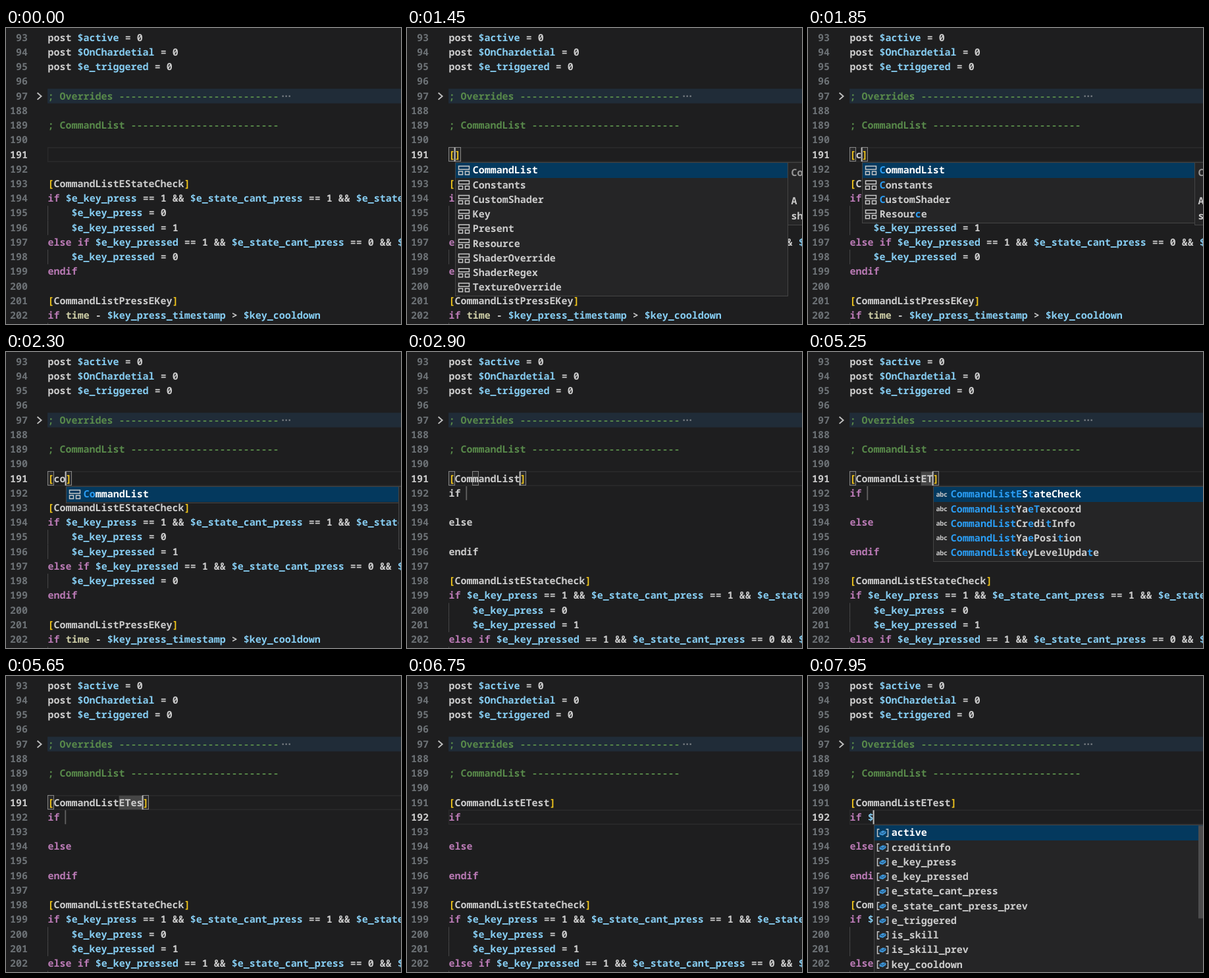
An HTML page for the animation above (8 s loop, 600 by 450 pixels).

```html
<!DOCTYPE html>
<html lang="en">
<head>
<meta charset="utf-8">
<title>Editor snippet completion</title>
<style>
html, body { margin: 0; width: 100%; height: 100%; overflow: hidden; background: #1e1e1f; }
svg { display: block; width: 600px; height: 450px; }
text { font: 600 15px "Noto Sans Mono", "DejaVu Sans Mono", monospace; white-space: pre; fill: #cccccc; text-rendering: geometricPrecision; }
.num { fill: #6c7175; text-anchor: end; }
.num.on { fill: #cacaca; }
.com { fill: #58894a; }
.var { fill: #86cdf2; }
.key { fill: #ba7ab5; }
.fn { fill: #cdcda6; }
.br { fill: #f0c51c; }
.hit { fill: #2a9df4; }
.sel { fill: #fff; }
.doc { text-anchor: start; fill: #999; }
.abc { font-size: 10px; font-weight: 700; letter-spacing: -.3px; }
.box { fill: #8888881c; stroke: #858585; }
.icon { fill: none; stroke: #c8c8c8; stroke-width: 1.5; }
</style>
</head>
<body>
<svg id="stage" viewBox="0 0 600 450"></svg>
<script>
const LOOP = 8000, ROW = 22.24, CH = 9, LEFT = 63.6;
const stage = document.getElementById("stage");

const rowY = row => 3.4 + row * ROW;
const base = row => rowY(row) + 16.2;
const colX = col => LEFT + col * CH;
const esc = s => s.replace(/&/g, "&amp;").replace(/</g, "&lt;").replace(/>/g, "&gt;");
const span = (cls, s) => `<tspan class="${cls}">${esc(s)}</tspan>`;
const text = (x, y, body, cls = "") => `<text x="${x}" y="${y}" class="${cls}">${body}</text>`;
const rect = (x, y, w, h, fill, extra = "") =>
  `<rect x="${x}" y="${y}" width="${w}" height="${h}" fill="${fill}" ${extra}/>`;

const numbers = [93, 94, 95, 96, 97, ...Array.from({ length: 15 }, (_, i) => 188 + i)];
const head = [
  "post $active = 0", "post $OnChardetial = 0", "post $e_triggered = 0", "",
  "; Overrides " + "-".repeat(27), "", "; CommandList " + "-".repeat(25), ""
];
const snippet = ["if ", "", "else", "", "endif"];
const tail = [
  "", "[CommandListEStateCheck]",
  "if $e_key_press == 1 && $e_state_cant_press == 1 && $e_state_cant_press_prev == 0",
  "    $e_key_press = 0", "    $e_key_pressed = 1",
  "else if $e_key_pressed == 1 && $e_state_cant_press == 0 && $e_state_cant_press_prev == 1",
  "    $e_key_pressed = 0", "endif", "", "[CommandListPressEKey]",
  "if time - $key_press_timestamp > $key_cooldown", "    "
];

const sections = ["CommandList", "Constants", "CustomShader", "Key", "Present", "Resource",
  "ShaderOverride", "ShaderRegex", "TextureOverride"];
const lists = ["EStateCheck", "YaeTexcoord", "CreditInfo", "YaePosition", "KeyLevelUpdate",
  "PressEKey", "KeyPress", "ReleaseKey", "YaeBlend", "SkillEnd", "Trigger", "Reset"]
  .map(s => "CommandList" + s);
const vars = ["active", "creditinfo", "e_key_press", "e_key_pressed", "e_state_cant_press",
  "e_state_cant_press_prev", "e_triggered", "is_skill", "is_skill_prev", "key_cooldown", "key_press"];

const popup = (kind, col, items, word = "") => ({ kind, col, items, word });
const names = (word, col, n) => popup("abc", col, lists.slice(0, n), "CommandList" + word);

// at: start time, name: header line, done: snippet inserted, lit: snippet keywords coloured
const steps = [
  { at: 0, blink: -700, name: "", col: 0 },
  { at: 1450, name: "[]", col: 1, pop: popup("section", 1, sections) },
  { at: 1800, name: "[c]", col: 2, pop: popup("section", 2, ["CommandList", "Constants", "CustomShader", "Resource"], "c") },
  { at: 2150, name: "[co]", col: 3, pop: popup("section", 3, ["CommandList"], "co") },
  { at: 2600, name: "[com]", col: 4, pop: popup("section", 3, ["CommandList"], "com") },
  { at: 2850, name: "[CommandList]", col: 12, done: 1, stale: 4 },
  { at: 2950, blink: 2850, name: "[CommandList]", col: 12, done: 1 },
  { at: 4400, name: "[CommandListE]", col: 13, done: 1, lit: 1, pop: names("E", 13, 12) },
  { at: 5100, name: "[CommandListET]", col: 14, done: 1, lit: 1, pop: names("ET", 14, 5) },
  { at: 5350, name: "[CommandListETe]", col: 15, done: 1, lit: 1,
    pop: popup("abc", 14, [lists[0], lists[1], lists[4]], "CommandListETe") },
  { at: 5550, name: "[CommandListETes]", col: 16, done: 1, lit: 1 },
  { at: 5750, name: "[CommandListETest]", col: 17, done: 1, lit: 1 },
  { at: 6250, name: "[CommandListETest]", row: 9, col: 3, done: 1, lit: 1 },
  { at: 7750, name: "[CommandListETest]", row: 9, col: 4, done: 1, lit: 1, typed: "$", pop: popup("var", 4, vars) }
];

function colour(line) {
  if (line[0] === ";") return span("com", line);
  return line.split(/(\$\w*|\b(?:if|else|endif|time)\b|[[\]])/).map(s =>
    s[0] === "$" ? span("var", s)
    : /^(if|else|endif)$/.test(s) ? span("key", s)
    : s === "time" ? span("fn", s)
    : /^[[\]]$/.test(s) ? span("br", s) : esc(s)).join("");
}

// Marks the letters of word found in order inside label.
function mark(label, word) {
  let k = 0;
  return [...label].map(c => {
    const hit = k < word.length && c.toLowerCase() === word[k].toLowerCase();
    if (hit) k++;
    return hit ? span("hit", c) : esc(c);
  }).join("");
}

function icon(kind, x, y) {
  if (kind === "abc") return text(x, y + 14.5, "abc", "abc");
  if (kind === "section")
    return `<path class="icon" d="M${x + 1} ${y + 5}h16v5h-16zM${x + 1} ${y + 13}h6v5h-6zM${x + 11} ${y + 13}h6v5h-6z"/>`;
  return `<path class="icon" d="M${x + 4} ${y + 6}h-3v11h3M${x + 14} ${y + 6}h3v11h-3"/>
    <path d="M${x + 4} ${y + 11}l5-3 5 1v3l-5 3.5-5-1.5z" fill="#3d94d6"/>
    <path d="M${x + 5} ${y + 11}l4 1.4 4-3" fill="none" stroke="#1d4568"/>`;
}

function drawPopup({ kind, col, items, word }, row) {
  const x = Math.round(colX(col)) + .5, y = Math.round(rowY(row + 1)) + .5;
  const h = Math.round(items.length * ROW) + 3, w = 505;
  let out = rect(x, y, w, h, "#252526", 'stroke="#454545"') + rect(x + .5, y + .5, w - 1, 23, "#04395e");
  items.forEach((label, i) => {
    const ry = y + .6 + i * ROW;
    out += icon(kind, x + 4, ry) + text(x + 26.3, ry + 16.3, mark(label, word), i ? "" : "sel");
  });
  if (kind === "section") {
    const px = x + w;
    out += rect(px, y, 300, 95, "#252526", 'stroke="#454545"')
      + text(px + 5, y + 20, "CommandList", "doc")
      + text(px + 5, y + 63, "A list of") + text(px + 5, y + 86, "shared");
  }
  if (kind === "var") out += rect(593, y + 1, 7, 141, "#4d4d4e");
  return out;
}

const bracket = (col, row = 8) =>
  rect(Math.round(colX(col)) - .5, Math.round(rowY(row)) + .5, CH, ROW - 1.2, "none", 'class="box"');

function draw(s, caret) {
  const row = s.row || 8;
  const block = s.done ? snippet.map((l, i) => i ? l : l + (s.typed || "")) : [];
  const lines = [...head, s.name, ...block, ...tail].slice(0, 21);
  let out = rect(LEFT - .5, rowY(4), 540, ROW, "#202c38");
  out += rect(LEFT, rowY(row) + .5, 540, ROW - 1, "none", 'stroke="#2a2a2b" stroke-width="1.6"');

  if (s.done && row === 8) {
    out += rect(colX(12), rowY(8) + .5, (s.col - 12) * CH, ROW - 1, "#464646");
    out += rect(colX(3) - 1.2, rowY(9) + .5, 1.8, ROW - 1, "#626262");
  }
  if (row === 8 && s.name) out += bracket(0) + bracket(s.name.length - 1);
  if (s.stale) out += bracket(s.stale);

  lines.forEach((line, i) => {
    const plain = s.done && !s.lit && i > 8 && i < 14;
    if (line.startsWith("    ")) out += rect(LEFT - .6, rowY(i), 1.1, ROW, "#444445");
    if (numbers[i]) out += text(33, base(i), numbers[i], i === row ? "num on" : "num");
    out += text(LEFT, base(i), plain ? esc(line) : colour(line));
  });

  out += '<path d="M47.6 98.5l6 5.2-6 5.2" fill="none" stroke="#c0c0c0" stroke-width="1.9"/>';
  for (const x of [420.5, 425.5, 430.5]) out += rect(x - 1, 102.5, 2.3, 2.3, "#7b8085");
  if (caret) out += rect(colX(s.col) - 1, rowY(row) + .5, 2, ROW - 1, "#c0c0c0");
  if (s.pop) out += drawPopup(s.pop, row);
  stage.innerHTML = out;
}

let shown = "";
function frame(now) {
  const t = now % LOOP;
  const s = steps.filter(p => p.at <= t).pop();
  const caret = Math.floor((t - (s.blink ?? s.at)) / 500) % 2 === 0;
  const id = s.at + "/" + caret;
  if (id !== shown) { draw(s, caret); shown = id; }
  requestAnimationFrame(frame);
}
frame(0);
</script>
</body>
</html>
```
